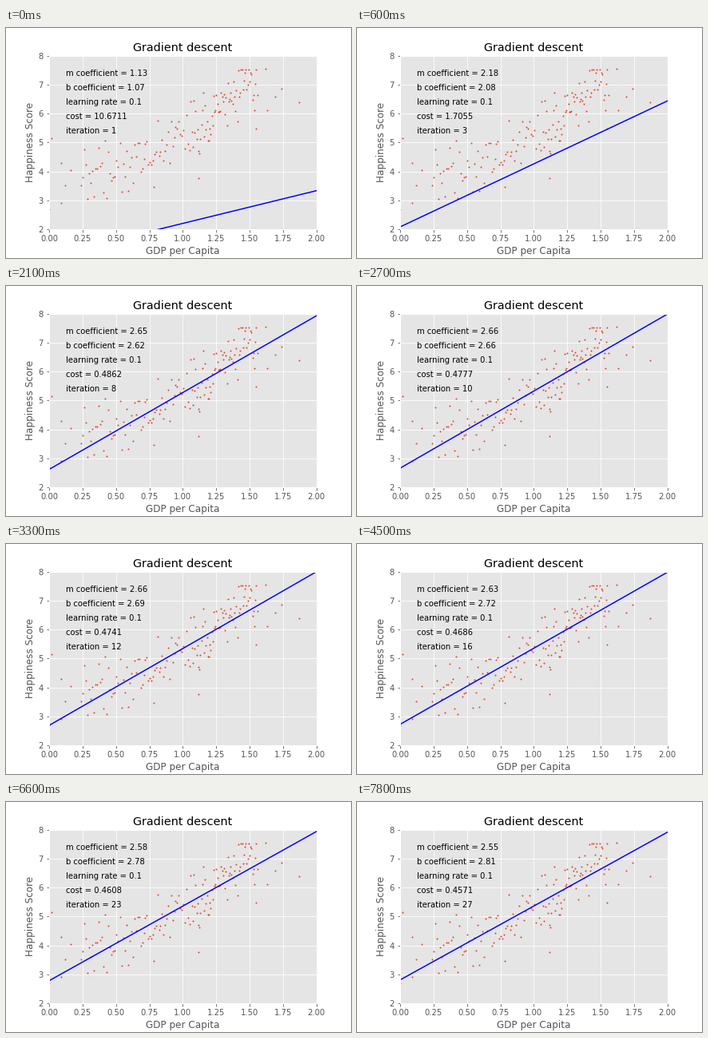
These frames come from a looping animation (432x288 px, 8000 ms). A matplotlib script:

```python
import matplotlib.pyplot as plt
import numpy as np
from matplotlib.animation import FuncAnimation

plt.style.use("ggplot")

RATE = 0.1
STEPS = 27
TICKS_PER_STEP = 3  # 100 ms ticks, one descent step every 300 ms

# Summary statistics of the data being fitted
MEAN_X, MEAN_Y = 0.984718, 5.354019
VAR_X, VAR_Y, COV_XY = 0.17592438, 1.27142532, 0.38425121

X_QUARTILES = [0.23, 0.66, 1.06, 1.31, 1.56]
OUTLIERS = [(0, 2.69), (0.02, 5.15), (0.09, 4.28), (0.09, 2.91), (0.12, 3.53),
            (0.16, 4.03), (1.12, 3.77), (0.78, 3.46), (1.55, 5.47),
            (1.63, 6.1), (1.62, 7.54), (1.69, 6.57), (1.74, 6.86),
            (1.87, 6.38)]


def scatter_points(count=141):
    """Seeded cloud along a rising curve, framed by a few outliers."""
    rng = np.random.default_rng(4)
    rank = (np.arange(count) + 0.5) / count
    x = np.interp(rank, np.linspace(0, 1, 5), X_QUARTILES)
    noise = np.clip(rng.normal(0, 0.52, count), -1, 1)
    y = np.minimum(3.75 + 0.2 * x + 1.3 * x**2 + noise, 7.53)
    return np.vstack([np.column_stack([x, y]), OUTLIERS]).T


def descend():
    """Slope, intercept and mean squared error after every step."""
    m = b = 0.0
    history = []
    for _ in range(STEPS):
        residual = MEAN_Y - b - m * MEAN_X
        slope_pull = COV_XY - m * VAR_X + MEAN_X * residual
        m += 2 * RATE * slope_pull
        b += 2 * RATE * residual
        residual = MEAN_Y - b - m * MEAN_X
        cost = residual**2 + VAR_Y - 2 * m * COV_XY + m**2 * VAR_X
        history.append((m, b, cost))
    return history


history = descend()

fig = plt.figure(figsize=(6, 4), dpi=72, facecolor="white")
fig.subplots_adjust(left=0.125, right=0.9, bottom=0.125, top=0.88)
ax = fig.add_subplot()
ax.scatter(*scatter_points(), s=2, color="#E24A33")
ax.set(xlim=(0, 2), ylim=(2, 8), title="Gradient descent",
       xlabel="GDP per Capita", ylabel="Happiness Score")
ends = np.array([0, 2])
line, = ax.plot(ends, ends, color="blue")
labels = [ax.text(0.125, 7.3 - 0.5 * row, "") for row in range(5)]


def update(tick):
    step = tick // TICKS_PER_STEP
    m, b, cost = history[step]
    line.set_ydata(m * ends + b)
    texts = (f"m coefficient = {round(m, 2)}",
             f"b coefficient = {round(b, 2)}",
             f"learning rate = {RATE}",
             f"cost = {round(cost, 4)}",
             f"iteration = {step + 1}")
    for label, text in zip(labels, texts):
        label.set_text(text)
    return [line, *labels]


anim = FuncAnimation(fig, update, frames=80, interval=100,
                     repeat=True, repeat_delay=0)
plt.show()
```
